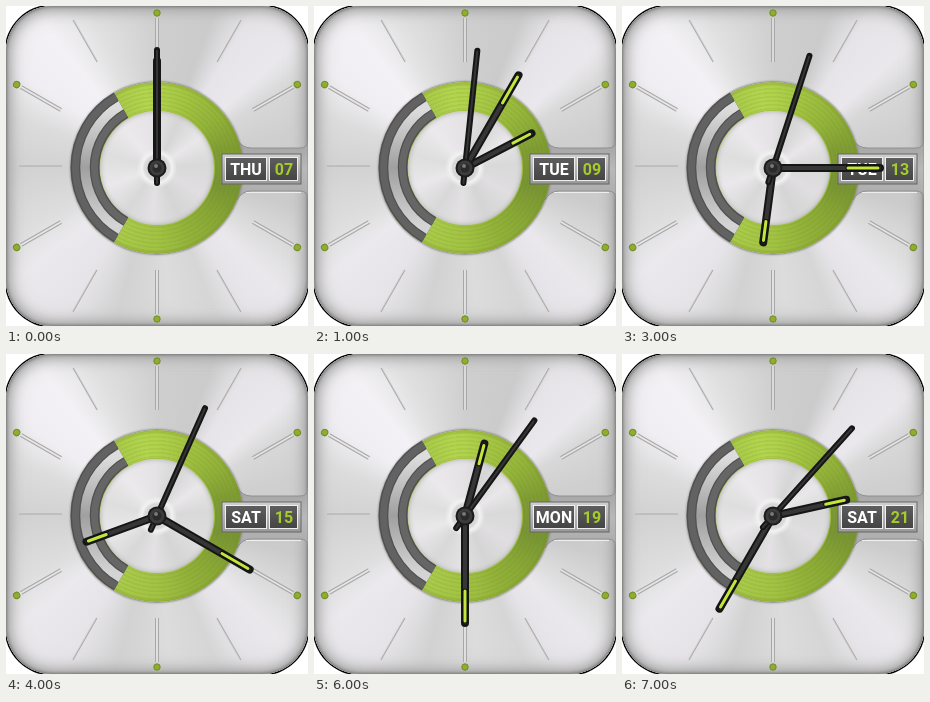
An HTML page for the animation above (8 s loop, 302x320 px).

```html
<!DOCTYPE html>
<html lang="en">
<head>
<meta charset="utf-8">
<title>Clock</title>
<style>
  html, body { margin: 0; width: 302px; height: 320px; overflow: hidden; background: #fff; }
  div, svg { position: absolute; }
  svg { left: 0; top: 0; }
  .face {
    inset: 0;
    border-radius: 46px;
    background:
      conic-gradient(at 151px 162px, #cfcfcf, #cbcbcb 20deg, #e6e4e8 32deg, #eae8ec 48deg, #d8d8d8 58deg,
        #cfcfcf 75deg, #cbcbcb 105deg, #dcdcdc 122deg, #eae8ec 135deg, #e6e4e8 147deg, #d6d6d6 158deg,
        #dcdcdc 175deg, #d2d2d2 195deg, #e6e4e8 212deg, #ebe9ed 232deg, #dedede 245deg, #d2d2d2 270deg,
        #dcdcdc 290deg, #f0eef2 305deg, #f3f1f5 322deg, #e0e0e0 338deg, #cfcfcf);
    box-shadow: 0 0 0 1.5px #000, inset 0 0 3px 1px #777, inset 0 0 14px 3px #999, inset 0 0 24px 2px #ccc;
  }
  .ring, .disk { border-radius: 50%; }
  .ring {
    left: 65px; top: 75.5px; width: 172px; height: 172px;
    background:
      repeating-radial-gradient(circle, #6a851800 0 2px, #6a851820 3px 4px),
      conic-gradient(#b0d24c, #a2c242 25deg, #93b23a 50deg, #7f9c34 75deg, #789434 105deg, #88a636 130deg,
        #93b23a 155deg, #a2c244 180deg, #a9ca4a 210deg, #a9ca4a 330deg, #b2d44e 350deg, #b0d24c);
    box-shadow: 0 0 2px 1px #8b8b8b, inset 0 0 4px #7b9428;
  }
  .disk {
    left: 94px; top: 104.5px; width: 114px; height: 114px;
    background:
      radial-gradient(circle, #d8d8d8 12px, #f2f2f2 15px, #f2f2f200 20px),
      conic-gradient(#e4e2e4, #d6d6d6 25deg, #e9e7e9 55deg, #d9d9d9 85deg, #e0dee0 120deg, #d5d5d5 155deg,
        #e3e1e3 185deg, #d8d8d8 215deg, #eae8ea 250deg, #dedede 285deg, #ebe9eb 320deg, #e4e2e4);
    box-shadow: 0 0 0 1px #a2c047, inset 0 0 5px #aaa;
  }
</style>
</head>
<body>
<div class="face"></div>
<svg width="302" height="320">
  <defs>
    <linearGradient id="notchFill" x2="0" y2="1">
      <stop stop-color="#a2a2a2"/><stop offset=".5" stop-color="#b8b8b8"/><stop offset="1" stop-color="#aaa"/>
    </linearGradient>
  </defs>
  <g id="ticks"></g>
  <path d="M231 133Q236 142 245 142H294Q302 142 302 134V193Q302 185 294 185H245Q236 185 231 194Z"
        fill="url(#notchFill)" stroke="#909090"/>
  <path d="M240 186.5H295" stroke="#eee"/>
</svg>
<div class="ring"></div>
<div class="disk"></div>
<svg width="302" height="320">
  <defs>
    <linearGradient id="grooveFill" x2="0" y2="1">
      <stop offset=".1" stop-color="#dcdcdc"/><stop offset=".5" stop-color="#a0a0a0"/>
      <stop offset=".9" stop-color="#d4d4d4"/>
    </linearGradient>
    <linearGradient id="frameFill" x2="0" y2="1">
      <stop stop-color="#d0d0d0"/><stop offset="1" stop-color="#989898"/>
    </linearGradient>
    <linearGradient id="cellFill" x2="0" y2="1">
      <stop stop-color="#5e5e5e"/><stop offset="1" stop-color="#444"/>
    </linearGradient>
  </defs>
  <g id="arcs" fill="none" transform="translate(151 161.5)"></g>

  <rect x="216" y="148" width="79" height="30" fill="url(#frameFill)" stroke="#666"/>
  <g fill="url(#cellFill)" stroke="#eee">
    <rect x="219.5" y="151.5" width="41" height="23"/>
    <rect x="263.5" y="151.5" width="28" height="23"/>
  </g>
  <g font-family="Roboto, sans-serif" font-weight="700" font-size="16" text-anchor="middle">
    <text id="day" x="240" y="168.5" fill="#fff"></text>
    <text id="date" x="278" y="168.5" fill="#a5cb2c"></text>
  </g>

  <g id="hands" transform="translate(151 162)" stroke-linecap="round"></g>
  <g transform="translate(151 162)">
    <circle r="9.5" fill="#1c1c1c"/>
    <circle r="7.5" fill="#3c3c3c"/>
    <circle r="4.5" fill="#2a2a2a"/>
    <circle cx="-1" cy="-2" r="2" fill="#777"/>
  </g>
</svg>
<script>
const $ = id => document.getElementById(id);

const add = (parent, tag, attrs) => {
  const el = document.createElementNS('http://www.w3.org/2000/svg', tag);
  for (const key in attrs) el.setAttribute(key, attrs[key]);
  return parent.appendChild(el);
};

// Hour mark running from an inner to an outer point, relative to the middle of the face
function mark(x1, y1, x2, y2, dotted) {
  const length = Math.hypot(x2 - x1, y2 - y1);
  const angle = Math.atan2(y2 - y1, x2 - x1) * 180 / Math.PI;
  const g = add($('ticks'), 'g', { transform: `translate(${151 + x1} ${160 + y1}) rotate(${angle})` });
  const line = (y, stroke) => add(g, 'path', { d: `M0 ${y}H${length}`, stroke });
  if (dotted) {
    line(0, '#e6e6e6');
    line(-1.5, '#a8a8a8');
    line(1.5, '#a8a8a8');
    add(g, 'circle', { cx: length + 5, r: 3.2, fill: '#8fad2e', stroke: '#718b25' });
  } else {
    line(.8, '#d4d4d4');
    line(0, '#aaa');
  }
}

for (const s of [-1, 1]) {
  mark(0, 104 * s, 0, 148 * s, true);
  mark(95 * s, 0, 138 * s, 0);
  for (const v of [-1, 1]) {
    mark(96 * s, 56 * v, 136 * s, 79 * v, true);
    mark(60 * s, 104 * v, 84 * s, 146 * v);
  }
}

for (const [r, width, stroke] of [
  [72, 29, '#505050'], [81.5, 7, '#626262'], [72, 9.5, 'url(#grooveFill)'], [62.5, 7, '#666']
]) {
  add($('arcs'), 'circle', {
    r, stroke, 'stroke-width': width, pathLength: 360, 'stroke-dasharray': '120 240', 'stroke-dashoffset': -120
  });
}

function hand(tip, tail, width, lit) {
  const g = add($('hands'), 'g', {});
  const bar = (from, to, w, stroke) => add(g, 'path', { d: `M0 ${-from}V${-to}`, stroke, 'stroke-width': w });
  bar(-tail, tip, width, '#161616');
  bar(-tail, tip - 1, width - 4, '#363636');
  if (lit) {
    bar(tip - lit, tip - 2, 5, '#111');
    bar(tip - lit, tip - 2, 3, '#c3e63c');
  }
  return angle => g.setAttribute('transform', `rotate(${angle})`);
}

const setHour = hand(75, 0, 8, 21);
const setMinute = hand(107, 0, 8, 32);
const setSecond = hand(118, 15, 6);

// Every step adds a month, two days, two hours, five minutes and a second
function frame(now) {
  const step = Math.floor(now / 1000) % 8;
  const when = new Date(2010, step, 7 + 2 * step);
  setHour(62.5 * step);
  setMinute(30 * step);
  setSecond(6 * step);
  $('day').textContent = when.toDateString().slice(0, 3).toUpperCase();
  $('date').textContent = String(when.getDate()).padStart(2, '0');
  requestAnimationFrame(frame);
}
frame(performance.now());
</script>
</body>
</html>
```
